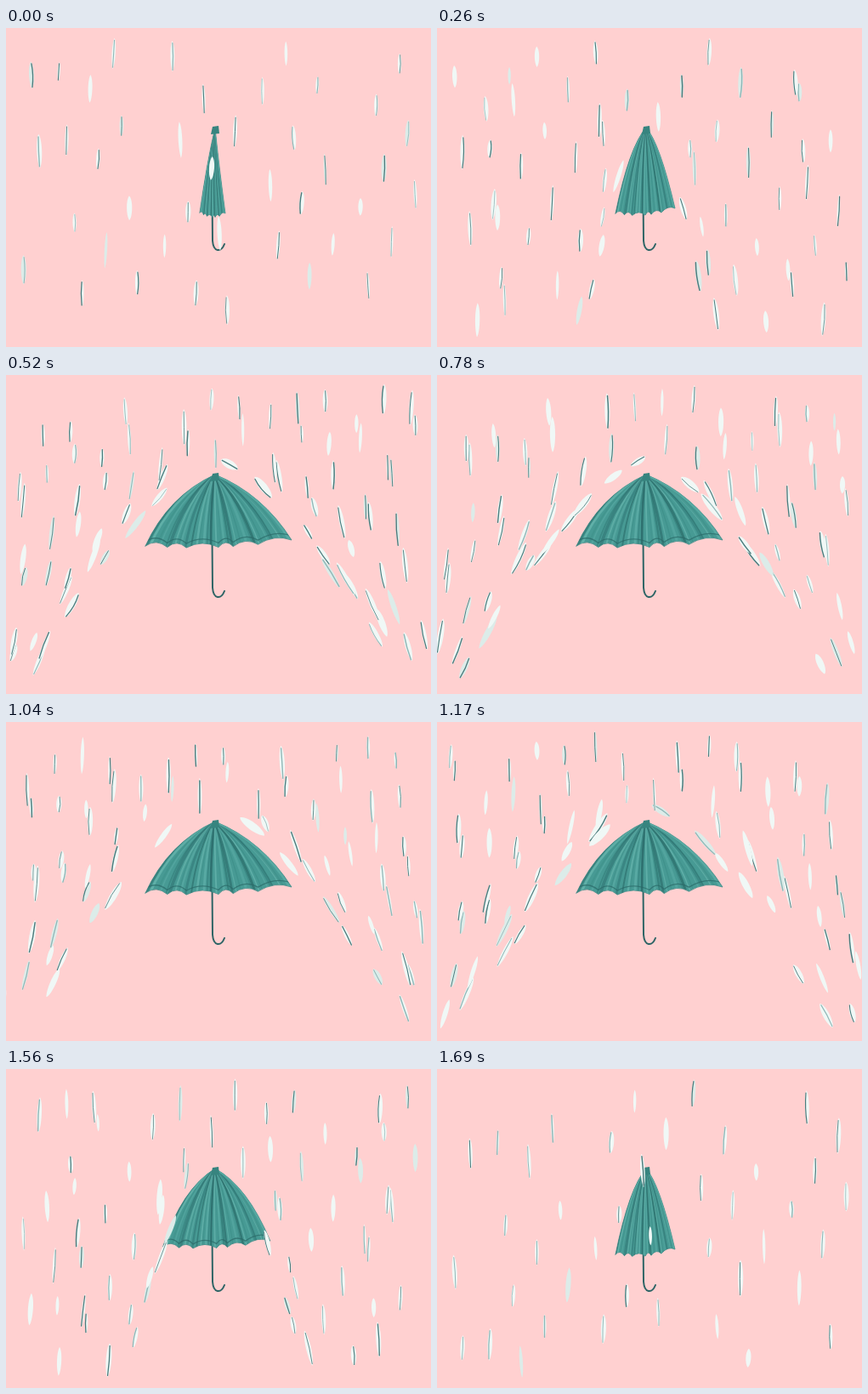
An HTML page with a canvas that plays this animation: 500 px wide and 375 px high, repeating every 1820 ms.

```html
<!DOCTYPE html>
<html lang="en">
<head>
<meta charset="utf-8">
<title>Umbrella in the rain</title>
<style>
  html, body { margin: 0; width: 100%; height: 100%; overflow: hidden; background: #ffd0d0; }
  canvas { display: block; width: 100vw; height: 100vh; }
</style>
</head>
<body>
<canvas id="stage" width="500" height="375"></canvas>
<script>
const ctx = document.getElementById('stage').getContext('2d');
const STEP = 130, STEPS = 14;

// Canopy poses: left control, left end, right control, right end, scallop height
const CLOSED = [236, 160, 228, 217, 249, 150, 258, 218, 5];
const HALF = [226, 140, 210, 218, 262, 135, 280, 212, 7];
const OPEN = [191, 142, 164, 201, 302, 140, 336, 194, 10];
const TIPS = [0, .15, .28, .5, .6, .77, 1];
const APEX = [246, 117];

const lerp = (a, b, t) => a + (b - a) * t;
const mix = (p, q, t) => p.map((v, i) => lerp(v, q[i], t));
const fract = v => v - Math.floor(v);
const hash = (a, b = 0) => fract(Math.sin(a * 127.1 + b * 311.7 + 4.3) * 43758.5453);

function poseAt(step) {
  if (step === 0) return CLOSED;
  if (step === 1) return mix(CLOSED, HALF, .5);
  if (step === 2 || step === 13) return HALF;
  if (step === 3 || step === 12) return mix(HALF, OPEN, .55);
  return OPEN;
}

// How strongly the rain is turned aside
function shelterAt(step) {
  if (step < 4) return [0, .15, .35, .7][step];
  return step < 11 ? 1 : [.9, .5, 0][step - 11];
}

// Control and end point of the rib at u, from left (0) to right (1)
function rib(pose, u) {
  const [lcx, lcy, lx, ly, rcx, rcy, rx, ry] = pose;
  const sag = 4 * u * (1 - u) * 5;
  return [lerp(lcx, rcx, u), lerp(lcy, rcy, u) + sag,
          lerp(lx, rx, u), lerp(ly, ry, u) + sag];
}

function hem(pose, lift) {
  for (let i = TIPS.length - 1; i > 0; i--) {
    const [, , x, y] = rib(pose, TIPS[i - 1]);
    const [, , mx, my] = rib(pose, (TIPS[i] + TIPS[i - 1]) / 2);
    ctx.quadraticCurveTo(mx, my - pose[8] - lift, x, y - lift);
  }
}

function stroke(color, width) {
  ctx.strokeStyle = color;
  ctx.lineWidth = width;
  ctx.stroke();
}

function drawUmbrella(pose) {
  const width = pose[6] - pose[2];
  ctx.lineCap = 'round';

  ctx.beginPath();
  ctx.moveTo(242.5, 190);
  ctx.lineTo(243, 250);
  ctx.bezierCurveTo(244, 264, 253, 264, 257, 254);
  stroke('#2d6465', 2);

  ctx.save();
  const [lcx, lcy, lx, ly] = rib(pose, 0);
  const [rcx, rcy, rx, ry] = rib(pose, 1);
  ctx.beginPath();
  ctx.moveTo(lx, ly);
  ctx.quadraticCurveTo(lcx, lcy, ...APEX);
  ctx.quadraticCurveTo(rcx, rcy, rx, ry);
  hem(pose, 0);
  ctx.closePath();
  ctx.fillStyle = '#479a94';
  ctx.fill();
  stroke('#3c8a86', .8);
  ctx.clip();

  // Brush strokes: a dark edge beside each light ridge
  const colors = ['#2a6b69', '#6ab8b0', '#3f918b', '#5cada6', '#337c79'];
  for (let i = 0; i < 34; i++) {
    const [cx, cy, x, y] = rib(pose, (i + hash(i, 2)) / 34);
    ctx.globalAlpha = .45 + .4 * hash(i, 5);
    ctx.beginPath();
    ctx.moveTo(...APEX);
    ctx.quadraticCurveTo(cx, cy, x, y);
    stroke(colors[i % 5], (.4 + hash(i, 9)) * (.8 + width / 90));
  }
  if (width > 100) {
    ctx.globalAlpha = .7;
    ctx.beginPath();
    ctx.moveTo(rx, ry - 5);
    hem(pose, 5);
    stroke('#2a6867', 1.3);
  }
  ctx.restore();

  ctx.beginPath();
  ctx.moveTo(241, 125);
  ctx.lineTo(243, 116);
  ctx.lineTo(250, 115);
  ctx.lineTo(251, 124);
  ctx.closePath();
  ctx.fillStyle = '#37847f';
  ctx.fill();
}

function drawDrop(x, y, angle, length, width, seed) {
  const h = length / 2;
  ctx.save();
  ctx.translate(x, y);
  ctx.rotate(angle);
  ctx.beginPath();
  ctx.moveTo(0, -h);
  ctx.bezierCurveTo(width, -h * .7, width * .8, h * .8, 0, h);
  ctx.bezierCurveTo(-width * .7, h * .6, -width * .8, -h * .6, 0, -h);
  ctx.fillStyle = hash(seed, 3) < .2 ? '#dcece9' : '#f0f8f6';
  ctx.fill();
  if (hash(seed, 4) < .72) {
    const side = (hash(seed, 6) - .5) * width;
    ctx.beginPath();
    ctx.moveTo(side * .4, -h * .85);
    ctx.quadraticCurveTo(side * 1.4, 0, side * .3, h * .9);
    stroke(hash(seed, 7) < .65 ? '#4b7c7d' : '#8fb7b7', .7 + hash(seed, 8) * .8);
  }
  ctx.restore();
}

// Falling columns bend outwards around the canopy
function bend(column, y, shelter) {
  const edge = shelter * 105 * Math.pow(Math.max(0, y - 100) / 90, .65);
  return Math.pow(column ** 4 + edge ** 4, .25);
}

function drawRain(step, shelter) {
  const count = 42 + 55 * shelter;
  for (let i = 0; i < count; i++) {
    const seed = i + step * 101;
    const column = 15 + 470 * fract(i * .7549 + .1) - 246;
    const y = 28 + 318 * fract(i * .5698 + step / 7 + hash(i) * .08);
    const away = Math.abs(column), reach = bend(away, y, shelter);
    if (reach - away > 12 + hash(i, 1) * 90) continue;
    const side = Math.sign(column);
    const slope = bend(away, y + 1, shelter) - reach;
    const angle = -side * Math.atan(slope) + (hash(seed, 1) - .5) * .14;
    drawDrop(246 + side * reach, y, angle,
             20 + 24 * hash(seed, 2), 2.5 + 2.5 * hash(seed, 5) + 3 * Math.min(1, slope), seed);
  }
}

function frame(now) {
  const step = Math.floor(now / STEP) % STEPS;
  ctx.fillStyle = '#ffd0d0';
  ctx.fillRect(0, 0, 500, 375);
  drawUmbrella(poseAt(step));
  drawRain(step, shelterAt(step));
  requestAnimationFrame(() => frame(performance.now() - start));
}

const start = performance.now();
frame(0);
</script>
</body>
</html>
```
